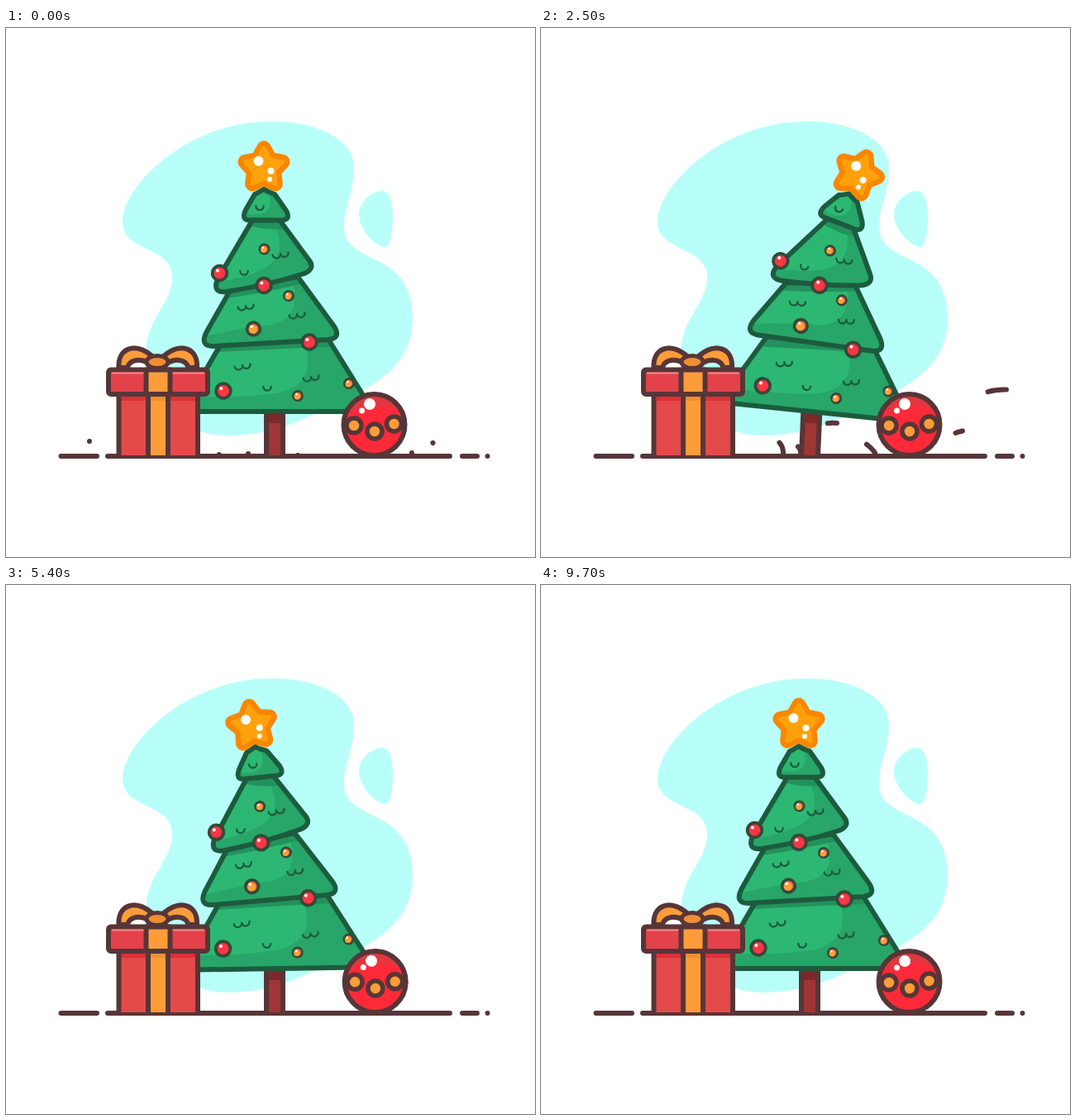
Write an HTML page that moves like this. It is 640x640 px and loops after 9.8 s.

```html
<!DOCTYPE html>
<html lang="en">
<head>
<meta charset="utf-8">
<title>Christmas tree in the wind</title>
<style>
  html, body { margin: 0; height: 100%; overflow: hidden; background: #fff; }
  svg { display: block; width: 100vw; height: 100vh; }
  path, rect, circle, ellipse { stroke-linecap: round; stroke-linejoin: round; }
  .line { stroke: #563638; stroke-width: 6; }
  .edge { fill: none; stroke: #1d5b3e; stroke-width: 6; }
  .mark { fill: none; stroke: #1d5b3e; stroke-width: 2.3; }
  .none { fill: none; }
  .sky { fill: #b8fffa; }
  .leaf { fill: #28a568; }
  .light { fill: #2cb872; }
  .shade { fill: #23915c; }
  .red { fill: #e44a4a; }
  .deep { fill: #dd3037; }
  .gold { fill: #ff9c3a; }
  .white { fill: #fff; }
</style>
</head>
<body>
<svg viewBox="0 0 640 640">
  <path class="sky" d="M141 235C141 190 220 113 321 113C380 113 421 137 421 168C421 200 409 215 409 240C409 290 492 265 492 352C492 412 438 436 405 452C362 472 325 493 268 493C205 493 169 440 169 395C169 350 201 335 201 301C201 264 141 271 141 235Z"/>
  <path class="sky" d="M427 225C427 210 443 197 455 197C465 197 468 215 468 230C468 250 464 265 459 265C448 265 427 245 427 225Z"/>
  <g id="wind" class="line none"></g>
  <path class="line none" d="M66.5 518H110M123 518H537M552 518H570M582.5 518h.01"/>
  <g id="tree"></g>

  <g id="gift">
    <rect class="red" x="136.5" y="443" width="95.5" height="74"/>
    <path class="deep" d="M137 443h95v8h-95z"/>
    <path class="gold" d="M172 443h24v74h-24z"/>
    <path fill="#ef8f31" d="M172 443h24v8h-24z"/>
    <path class="line none" d="M136.5 443V516M232 443V516M172 443V516M196 443V516"/>
    <rect class="line" fill="#e3424a" x="124" y="413.5" width="120" height="29.5" rx="3"/>
    <path d="M129 417.5H239" stroke="#f58a86" stroke-width="2"/>
    <path class="line gold" d="M169.5 413.5h29v29.5h-29z"/>
    <path id="loop" class="line gold" d="M136.5 411C135 388 155 379 177 397L172 405C160 399 149 402 147 411Z"/>
    <use href="#loop" transform="matrix(-1 0 0 1 367.5 0)"/>
    <ellipse class="line" fill="#ef8f31" cx="183" cy="404" rx="13" ry="7.5" style="stroke-width:5"/>
  </g>

  <g id="ball">
    <circle fill="#ff2a39" cx="445.5" cy="480" r="37"/>
    <path fill="#e0383f" d="M411 466A37 37 0 0 1 480 466Q463 455 445 457Q425 458 411 466Z"/>
    <circle class="line none" cx="445.5" cy="480" r="37"/>
    <g class="line gold" style="stroke-width:5.5">
      <circle cx="421" cy="481" r="9"/>
      <circle cx="446" cy="488" r="9"/>
      <circle cx="469.5" cy="479" r="9"/>
    </g>
    <circle class="white" cx="440" cy="455" r="7"/>
    <circle class="white" cx="430.5" cy="463" r="3.5"/>
  </g>
</svg>
<script>
const LOOP = 9800;
const $ = id => document.getElementById(id);
const smooth = u => (u = Math.min(1, Math.max(0, u)), u * u * (3 - 2 * u));

// Gusts: strokes that grow along their path, then vanish tail first
$('wind').innerHTML = [
  'M101 500C103 480 118 470 140 476C152 480 158 490 160 500',
  'M258 516C256 500 266 495 279 496C288 499 293 505 293 514',
  'M293 515C294 506 300 503 306 504C311 505 314 509 314 513',
  'M326 505C327 488 334 476 358 478',
  'M353 517C360 503 370 499 383 499C393 501 400 508 404 514',
  'M491 514C487 506 490 499 494 495C499 490 504 489 510 487.5',
  'M516.5 502C508 486 509 466 523 450C533 441 546 437 563 437.5'
].map(d => `<path pathLength="1" d="${d}"/>`).join('');

const smile = (x, y) => `<path class="mark" d="M${x - 4.7} ${y - 2}a4.7 4.7 0 0 0 9.4 0"/>`;
const smiles = (x, y) => `<path class="mark" d="M${x - 9.4} ${y - .5}a4.7 4.7 0 0 0 9.4 -1.5a4.7 4.7 0 0 0 9.4 -1.5"/>`;
const dot = (x, y, r) => `<circle class="white" cx="${x}" cy="${y}" r="${r}"/>`;

function bauble(x, y, r, orange) {
  const ring = r > 7 ? 3.8 : 2.8;
  return `<circle cx="${x}" cy="${y}" r="${r}" fill="${orange ? '#ff6f3c' : '#ff3644'}" stroke="#33493a" stroke-width="${ring}"/>` +
    (orange ? `<circle cx="${x - .8}" cy="${y + .8}" r="${r * .65}" fill="#ffa03c"/>` : '') +
    dot(x - r * .3, y - r * .35, r * .23);
}
const red = (x, y) => bauble(x, y, 8.8);
const orange = (x, y, r = 5.6) => bauble(x, y, r, true);

const tier = (outline, light, shade) =>
  `<path class="leaf" d="${outline}"/><path class="light" d="${light}"/>` +
  `<path class="shade" d="${shade}"/><path class="edge" d="${outline}"/>`;

function star(cx, cy, outer, inner) {
  const points = Array.from({ length: 10 }, (_, i) => {
    const a = i * Math.PI / 5, r = i % 2 ? inner : outer;
    return [cx + r * Math.sin(a), cy - r * Math.cos(a)].map(v => v.toFixed(2));
  });
  const layer = (color, width) =>
    `<path d="M${points.join('L')}Z" fill="${color}" stroke="${color}" stroke-width="${width}"/>`;
  return layer('#f98600', 17.5) + layer('#ffa10b', 4.5);
}

// Each part hangs on the one before; keys give [ms, degrees] relative to it
const parts = [
  {
    pivot: [325, 518],
    keys: [[0, 0], [1700, 2.5], [2500, 2.5], [4100, 0]],
    art: `<path fill="#a03535" d="M315 460h20v57h-20z"/><path fill="#7d292b" d="M315 460h20v18h-20z"/>
      <path class="line none" d="M315 460V517M335 460V517"/>`
  },
  {
    pivot: [325, 464],
    keys: [[150, 0], [1850, 3.4], [2500, 3.4], [4500, -2.6], [6000, 0]],
    art: tier('M262 379L222 448Q213 464 230 464H426Q446 464 435 449L389 375Z',
        'M262 379L224 446Q290 448 332 441Q365 432 365 405Q365 390 360 377Z',
        'M261 380L255 392Q330 388 394 386L387 375Z') +
      smiles(286, 410) + smiles(369, 424) + smile(316, 436) +
      red(263, 439) + orange(353, 445) + orange(415, 430)
  },
  {
    pivot: [320, 384],
    keys: [[300, 0], [2050, 5.3], [2550, 5.3], [4600, -1.8], [6050, 0]],
    art: tier('M272 316L242.5 368Q234 385 251 385L390 377Q406 375 397 361L353 301Z',
        'M272 316L240 373Q290 362 320 359Q348 354 349 330Q350 315 345 302Z',
        'M272 316L267 327Q315 320 360 309L353 301Z') +
      smiles(290, 338) + smiles(352, 348) +
      orange(299.5, 364, 7.8) + orange(342, 324) + red(367, 380)
  },
  {
    pivot: [312, 312],
    keys: [[400, 0], [2200, 5.25], [2850, 5.25], [4850, -1.3], [6100, 0]],
    art: tier('M299 231L256 304Q249 321 267 319Q318 311 361 297Q375 291 366 280L330 231Z',
        'M299 231L254 308Q290 302 312 291Q332 280 331 260Q329 245 322 231Z',
        'M299 232L295 239Q315 245 339 243L330 231Z') +
      smiles(332, 275) + smile(288, 296) +
      red(258.5, 296.5) + red(312, 311.5) + orange(312.5, 267.5)
  },
  {
    pivot: [313, 232],
    keys: [[450, 0], [2300, 4.5], [3300, 4.5], [4650, -3.8], [5000, -3.8], [7050, 0]],
    art: tier('M312 195Q304 200 301 201L290 220Q284 232.5 295 232.5H333Q345 232.5 339 221L325 201Q316 198 312 195Z',
        'M312 195Q304 200 301 201L289 224Q306 228 315 222Q323 213 317 198Z', '') +
      smile(307, 217.5)
  },
  {
    pivot: [312, 192],
    keys: [[0, 0], [700, -1.4], [2450, 4.6], [3200, 4.6], [4700, -1.9], [5800, -3.2], [7050, 0]],
    art: star(312, 169.3, 24, 13) + dot(305.5, 161, 6) + dot(320.5, 173, 4) + dot(319, 183, 3)
  }
];

let parent = $('tree');
for (const part of parts) {
  part.group = document.createElementNS('http://www.w3.org/2000/svg', 'g');
  part.group.innerHTML = part.art;
  parent = parent.appendChild(part.group);
}

function valueAt(keys, t) {
  let value = keys[0][1];
  for (let i = 1; i < keys.length; i++) {
    const [t0, v0] = keys[i - 1], [t1, v1] = keys[i];
    value += (v1 - v0) * smooth((t - t0) / (t1 - t0));
  }
  return value;
}

function draw(t) {
  for (const { group, pivot, keys } of parts)
    group.setAttribute('transform', `rotate(${valueAt(keys, t)} ${pivot})`);

  const head = smooth(t / 1450), tail = smooth((t - 1500) / 1450);
  const wind = $('wind').style;
  wind.display = tail < 1 ? '' : 'none';
  wind.strokeDasharray = `${Math.max(.001, head - tail)} 3`;
  wind.strokeDashoffset = -tail;

  const roll = (1 - Math.cos(t / LOOP * 8 * Math.PI)) / 2;
  $('ball').setAttribute('transform', `translate(${3.3 * roll}) rotate(${5.2 * roll} 445.5 480)`);
}

function frame() {
  draw(performance.now() % LOOP);
  requestAnimationFrame(frame);
}
frame();
</script>
</body>
</html>
```
